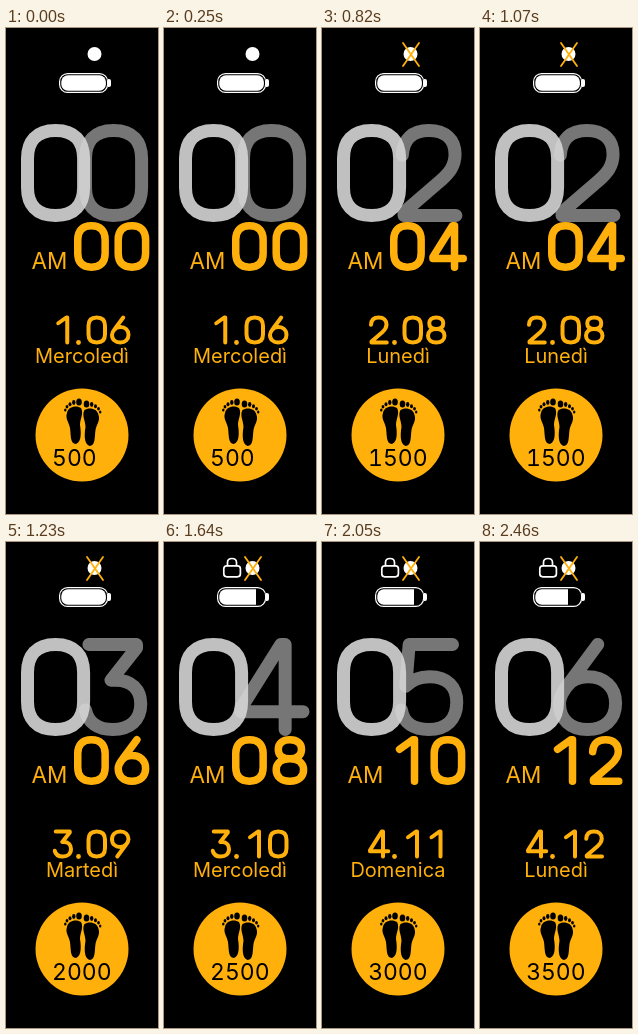
Recreate the animation shown at these times as an HTML page. Size 152 px wide and 486 px high, loop 2870 ms.

```html
<!DOCTYPE html>
<html lang="it">
<head>
<meta charset="utf-8">
<title>Watch face</title>
<style>
  html, body { margin: 0; width: 100%; height: 100%; overflow: hidden; background: #000; }
  svg { display: block; width: 152px; height: 486px; }
  text { font-family: Inter, Roboto, sans-serif; fill: #ffb00b; font-variant-numeric: tabular-nums; }
  .digits path, .icon { fill: none; stroke-linecap: round; stroke-linejoin: round; }
  #minutes, #date { stroke: #ffb00b; }
  #steps { fill: #000; }
</style>
</head>
<body>
<svg viewBox="0 0 152 486">
  <defs>
    <g id="foot">
      <path d="M61 385C62 378 71 377 75 380C78 385 74 391 74 397C75 403 76 414 70 416C64 416 65 407 64 400C63 394 59 391 61 385Z"/>
      <ellipse cx="73" cy="374" rx="2.8" ry="3.5"/>
      <ellipse cx="67.8" cy="374.5" rx="1.7" ry="2.4"/>
      <ellipse cx="64" cy="376.2" rx="1.5" ry="2"/>
      <ellipse cx="61" cy="378.8" rx="1.4" ry="1.8"/>
      <ellipse cx="59.3" cy="382" rx="1.2" ry="1.6"/>
    </g>
    <clipPath id="charge"><rect id="level" x="50" y="45" height="20"/></clipPath>
  </defs>

  <g id="lock" class="icon" stroke="#fff" stroke-width="1.7">
    <rect x="59.8" y="23.8" width="16.6" height="11" rx="3"/>
    <path d="M63.5 23.5V20.5Q63.5 16.5 68 16.5T72.5 20.5V23.5"/>
  </g>
  <circle cx="88.5" cy="26" r="7" fill="#fff"/>
  <path id="cross" class="icon" stroke="#ffb00b" stroke-width="1.8" d="M81 15L97 38M97 15L81 38"/>

  <rect x="53.6" y="45.6" width="48" height="18.8" rx="8" fill="none" stroke="#fff" stroke-width="1.2"/>
  <rect x="55.3" y="47.3" width="44.6" height="15.4" rx="6.5" fill="#fff" clip-path="url(#charge)"/>
  <path d="M102 51H103Q105 51 105 53V57Q105 59 103 59H102Z" fill="#fff"/>

  <g id="hours" class="digits"></g>
  <g id="minutes" class="digits"></g>
  <g id="date" class="digits"></g>
  <circle cx="72.5" cy="314.5" r="2.4" fill="#ffb00b"/>

  <text x="25.5" y="241" font-size="22.5">AM</text>
  <text id="weekday" x="76" y="335" font-size="20" text-anchor="middle"></text>

  <circle cx="76" cy="407" r="46.5" fill="#ffb00b"/>
  <use href="#foot"/>
  <use href="#foot" transform="translate(153.5 2) scale(-1 1)"/>
  <text id="steps" x="46" y="437.5" font-size="23"></text>
</svg>
<script>
const STEP = 410, COUNT = 7;
const WEEKDAYS = ["Mercoledì", "Domenica", "Lunedì", "Martedì"];

// Digit centre lines in a 66 x 100 box
const DIGITS = [
  "M33 0C10 0 0 13 0 33V67C0 87 10 100 33 100S66 87 66 67V33C66 13 56 0 33 0Z",
  "M14 23L46 0H50V100",
  "M1 29C2 10 13 0 32 0C52 0 63 11 63 28C63 42 56 50 46 59L3 96V100H64",
  "M4 0H60V4L30 42H36C54 42 65 53 65 70C65 89 52 100 32 100C14 100 3 92 0 77",
  "M49 100V0H44L-3 75V79H70",
  "M60 0H9L5 49C11 43 20 38 33 38C54 38 65 50 65 68C65 88 53 100 32 100C14 100 2 92 0 77",
  "M45 0L11 46C3 56 0 62 0 69C0 88 13 100 33 100S66 88 66 69S53 38 33 38C22 38 14 42 9 49",
  "M2 0H64V5L24 100",
  "M33 46C14 46 5 37 5 23S15 0 33 0S61 9 61 23S52 46 33 46C12 46 0 57 0 73S13 100 33 100S66 89 66 73S54 46 33 46Z",
  "M21 100L55 54C63 44 66 38 66 31C66 12 53 0 33 0S0 12 0 31S13 62 33 62C44 62 52 58 57 51"
];

const get = id => document.getElementById(id);
const pad = n => String(n).padStart(2, "0");

function digit(value, x, y, scale, weight, color = "") {
  const stroke = color && `stroke="${color}"`;
  return `<path d="${DIGITS[value]}" transform="translate(${x} ${y}) scale(${scale})" stroke-width="${weight / scale}" ${stroke}/>`;
}

function row(text, xs, y, scale, weight) {
  return [...text].map((c, i) => digit(c, xs[i], y, scale, weight)).join("");
}

function show(i) {
  get("hours").innerHTML =
    digit(0, 21.5, 102.5, 0.85, 13, "#c0c0c0") +
    digit(i, i === 1 ? 89 : 79.5, 102.5, 0.85, 13, "rgba(216,216,216,.55)");
  get("minutes").innerHTML = row(pad(2 * i), [71.75, 112.2], 197.75, 0.415, 7.5);
  const day = Math.floor((i + 3) / 2);
  get("date").innerHTML = row(day + pad(6 + i), [48.75, 82.5, 106], 289.5, 0.25, 4);
  get("weekday").textContent = WEEKDAYS[i % 4];
  get("steps").textContent = 500 * (i + 1);
  get("cross").style.display = i >= 2 ? "" : "none";
  get("lock").style.display = i >= 4 ? "" : "none";
  get("level").setAttribute("width", i < 4 ? 52 : i < 6 ? 42 : 38);
}

let shown = -1;
function tick() {
  const i = Math.floor(performance.now() / STEP) % COUNT;
  if (i !== shown) show(shown = i);
  requestAnimationFrame(tick);
}
tick();
</script>
</body>
</html>
```
